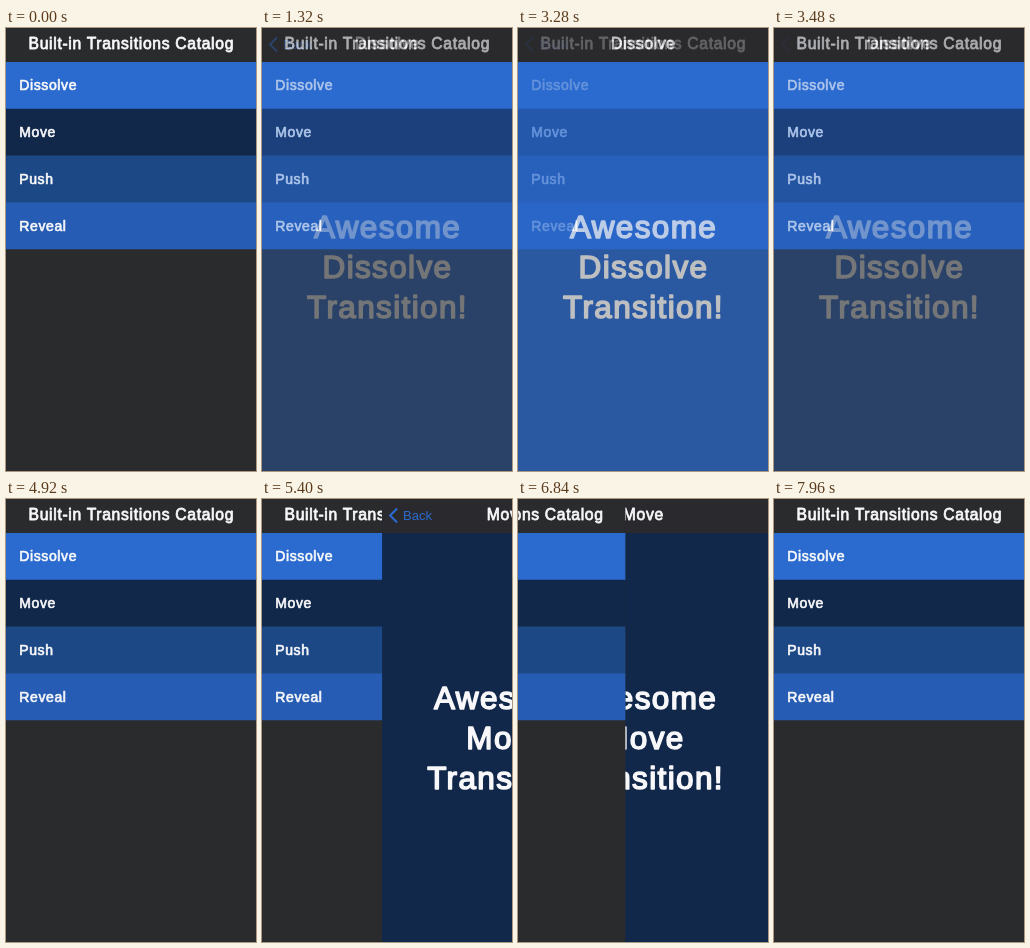
Animation of 250 by 443 pixels, one loop 8 s. Source, as an HTML page:

```html
<!DOCTYPE html>
<html lang="en">
<head>
<meta charset="utf-8">
<title>Transitions</title>
<style>
  html, body { margin: 0; width: 100%; height: 100%; overflow: hidden; background: #2a2b2d; }
  svg { position: absolute; left: 0; top: 0; width: 250px; height: 443px; }
  text { font-family: "Liberation Sans", Arial, sans-serif; }
  /* Regular weight thickened by a round stroke gives rounded bold letters */
  .bold {
    fill: #f8f8fa; stroke: #f8f8fa; stroke-width: .05em;
    stroke-linejoin: round; letter-spacing: .043em;
  }
  .mid { text-anchor: middle; }
</style>
</head>
<body>
<svg id="detail" viewBox="0 0 250 443"></svg>
<svg id="list" viewBox="0 0 250 443"></svg>
<script>
const LOOP = 8000, DURATION = 560, WIDTH = 250;
const rows = [['Dissolve', '#2b6bd0'], ['Move', '#12284b'], ['Push', '#1d4886'], ['Reveal', '#265cb3']];
const visits = [
  { row: 0, push: 1120, press: 2940, pop: 3125 },
  { row: 1, push: 5110, press: 6420, pop: 6600 },
];
const list = document.getElementById('list');
const detail = document.getElementById('detail');

const rect = (y, h, color) => `<rect y="${y}" width="250" height="${h}" fill="${color}"/>`;
const label = (s, x, y, size, cls = '') =>
  `<text class="bold ${cls}" x="${x}" y="${y}" font-size="${size}">${s}</text>`;
const title = s => label(s, 125.3, 21.3, 15.7, 'mid');

list.innerHTML = rect(0, 443, '#2a2b2d') + title('Built-in Transitions Catalog') +
  rows.map(([name, color], i) => {
    const y = 34 + i * 46.75;
    return rect(y, 47, color) + label(name, 13.3, y + 28.3, 14);
  }).join('');

let shown = -1;
function fillDetail(row) {
  if (row === shown) return;
  shown = row;
  const [name, color] = rows[row];
  detail.innerHTML = rect(0, 443, color) + rect(0, 34, '#2a2a2e') + title(name) +
    `<g id="back"><path d="M15 9.5L8 16.5L15 23.5" fill="none" stroke="#2b6bd0" stroke-width="2"/>
     <text x="21" y="21" font-size="13" fill="#2b6bd0">Back</text></g>` +
    ['Awesome', name, 'Transition!'].map((s, i) => label(s, 125.5, 210 + i * 40.2, 31.5, 'mid')).join('');
}

const progress = (t, start, length) => Math.min(1, Math.max(0, (t - start) / length));

function place(el, x, opacity, z) {
  el.style.transform = `translateX(${x}px)`;
  el.style.opacity = opacity;
  el.style.zIndex = z;
}

function draw(t) {
  const visit = visits[t < 4400 ? 0 : 1];
  fillDetail(visit.row);
  const pushed = progress(t, visit.push, DURATION);
  const popped = progress(t, visit.pop, DURATION);
  document.getElementById('back').style.opacity = 1 - .85 * progress(t, visit.press, 140);

  if (visit.row === 0) {
    place(list, 0, 1, 0);
    place(detail, 0, pushed * (1 - popped), 1);
  } else {
    // Each incoming screen slides over the one at rest
    const leaving = popped > 0;
    place(detail, (1 - pushed) * WIDTH, 1, 1);
    place(list, leaving ? (popped - 1) * WIDTH : 0, 1, leaving ? 2 : 0);
  }
}

function tick() {
  draw(performance.now() % LOOP);
  requestAnimationFrame(tick);
}
tick();
</script>
</body>
</html>
```
